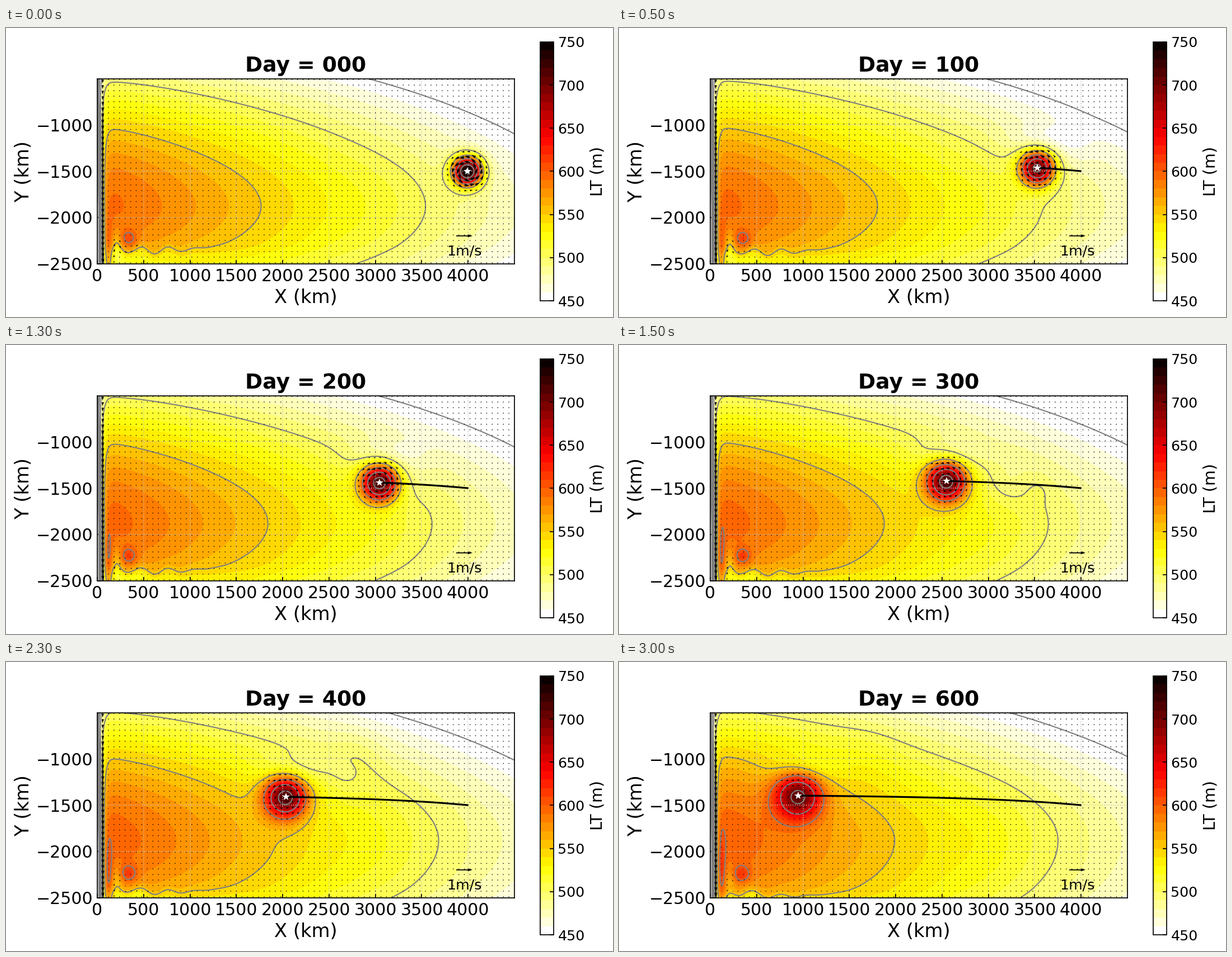
These frames come from a looping animation (1084 by 517 pixels, 3.5 s). A matplotlib script:

```python
import numpy as np
import matplotlib.pyplot as plt
from matplotlib.animation import FuncAnimation

W, H = 1084, 517
PT = 0.72  # points per pixel at 100 dpi

plt.rcParams["font.family"] = "DejaVu Sans"
plt.rcParams["axes.linewidth"] = 1.7 * PT

x = np.arange(0, 4501, 10.0)
y = np.arange(-2500, -499, 10.0)
X, Y = np.meshgrid(x, y)
CMAP = plt.get_cmap("hot_r", 30)

# Ring strength (m) and radius (km) every 100 days
RING_AMP = [274, 218, 214, 200, 185, 165, 148]
RING_RADIUS = [152, 183, 197, 214, 222, 236, 243]
# Ripples left behind the ring: x, y, amplitude, width
WAKE = {
    1: [(3938, -1313, -7, 150)],
    2: [(3395, -1373, -8, 170)],
    3: [(3183, -1464, -13, 170), (3533, -1512, 6, 100)],
    4: [(2690, -1200, -14, 150), (2780, -1000, 13, 200)],
    5: [(2300, -850, 4, 250)],
    6: [(1700, -950, 5, 250)],
}


def bump(x0, y0, amp, sx, sy=None):
    sy = sy or sx
    return amp * np.exp(-((X - x0) / sx) ** 2 / 2 - ((Y - y0) / sy) ** 2 / 2)


def ring_center(n):
    xc = 3993 - 456 * n - 8.5 * n**2
    yc = -1500 + 115 * (1 - np.exp(-n / 2.7))
    return xc, yc


def gyre(n):
    ridge = 600.5 + 1.05 * n - X / 35 - 6 * np.exp(-X / 300)
    ridge += bump(3050, -1900, 2.5 + 0.5 * n, 300, 350)
    d = Y + 1880
    xk = X / 1000
    north = (0.1315 - 0.0175 * xk + 0.0011 * xk**2) * (np.hypot(d, 900) - 900)
    offshore = 1 - np.exp(-((X / 180) ** 2))
    south = (4.5e-5 + 7e-5 * offshore * np.exp(-X / 1200) - 0.32e-5 * n) * d**2
    return ridge - np.where(d > 0, north, south)


def southern_front(n):
    meander = (55 - 4 * n) * np.cos(2 * np.pi * (X - 620) / 300)
    front = -2353 - 20 * n - meander * np.exp(-(((X - 620) / 380) ** 2))
    offshore = 1 - np.exp(-((X / 180) ** 2))
    return -29 * offshore * np.exp(-X / 700) * (1 + np.tanh((front - Y) / 50))


def coast(n):
    drop = np.interp(Y, [-1900, -700], [1000, 250])
    h = -drop * np.exp(-X / 26)
    h += bump(350 - 12 * (n % 2 == 0), -2232 - 3 * n, 33, 65)
    h += bump(215, -2330, -32 + 2 * n, 40, 130)
    h += bump(420, -2450, -2.5 * n, 70, 60)
    h += bump(120, -2330 + 25 * n, 22 + 1.5 * n, 25, 260)
    return h


def thickness(n):
    xc, yc = ring_center(n)
    h = gyre(n) + southern_front(n) + coast(n)
    h += bump(xc, yc, RING_AMP[n], RING_RADIUS[n] / np.sqrt(2))
    if n:
        h += bump(xc + 70, yc + 295, -20 - n, 270, 115)
    for x0, y0, amp, size in WAKE.get(n, []):
        h += bump(x0, y0, amp, size)
    return h


def currents(h):
    hy, hx = np.gradient(h, 10.0)
    u, v = 0.25 * hy, -0.25 * hx
    speed = np.hypot(u, v)
    limit = np.minimum(1, 0.4 / np.maximum(speed, 1e-9))
    return u * limit, v * limit


fig = plt.figure(figsize=(W / 100, H / 100), dpi=100, facecolor="white")


def pixel_axes(left, top, right, bottom):
    return fig.add_axes([left / W, 1 - bottom / H, (right - left) / W, (bottom - top) / H])


def label(px, py, text, size, **kw):
    kw = {"ha": "center", "va": "center", **kw}
    return fig.text(px / W, 1 - py / H, text, fontsize=size * PT, **kw)


ax = pixel_axes(163, 90.5, 908, 421.5)
ax.set_xlim(0, 4500)
ax.set_ylim(-2500, -500)
ax.set_xticks(range(0, 4001, 500))
ax.set_yticks(range(-2500, -999, 500))
ax.tick_params(direction="in", length=7.3 * PT, width=1.7 * PT,
               pad=7.4 * PT, labelsize=30 * PT)
ax.tick_params(axis="x", pad=8.6 * PT)
ax.grid(color="silver", linestyle=":", linewidth=1.5 * PT)

cax = pixel_axes(954, 25, 978, 488)
shades = plt.cm.ScalarMappable(plt.Normalize(450, 750), CMAP)
fig.colorbar(shades, cax=cax, ticks=range(450, 751, 50))
cax.tick_params(direction="in", length=7.3 * PT, width=1.7 * PT,
                pad=7.4 * PT, labelsize=25.4 * PT)

title = label(535, 78, "", 37.6, va="baseline", weight="bold")
label(535, 482, "X (km)", 33.8)
label(32, 257, "Y (km)", 33.8, rotation=90)
label(1057, 256, "LT (m)", 28.8, rotation=90)

cols = slice(6, None, 6)
rows = slice(199, None, -6)
zero = np.zeros_like(X[rows, cols])
arrows = ax.quiver(X[rows, cols], Y[rows, cols], zero, zero,
                   scale=25.5, width=0.0024, zorder=3)
ax.quiverkey(arrows, 0.88, 0.15, 1, "1m/s", labelpos="S", labelsep=0.16,
             fontproperties={"size": 25.4 * PT})
trail, = ax.plot([], [], "k", linewidth=3.2 * PT, zorder=4)
star, = ax.plot([], [], "*", color="white", markersize=15 * PT,
                markeredgewidth=0, zorder=5)
contours = []


def update(n):
    while contours:
        contours.pop().remove()
    h = thickness(n)
    contours.append(ax.contourf(X, Y, h, np.arange(450, 751, 10), cmap=CMAP, zorder=1))
    contours.append(ax.contour(X, Y, h, np.arange(50, 751, 50), colors="gray",
                               linewidths=2.1 * PT, zorder=2))
    u, v = currents(h)
    arrows.set_UVC(u[rows, cols], v[rows, cols])
    path = ring_center(np.linspace(0, n, 20 * n + 1))
    trail.set_data(path[0], path[1])
    xc, yc = ring_center(n)
    star.set_data([xc], [yc])
    title.set_text(f"Day = {100 * n:03d}")
    return []


anim = FuncAnimation(fig, update, frames=7, interval=500, repeat=True)
plt.show()
```
